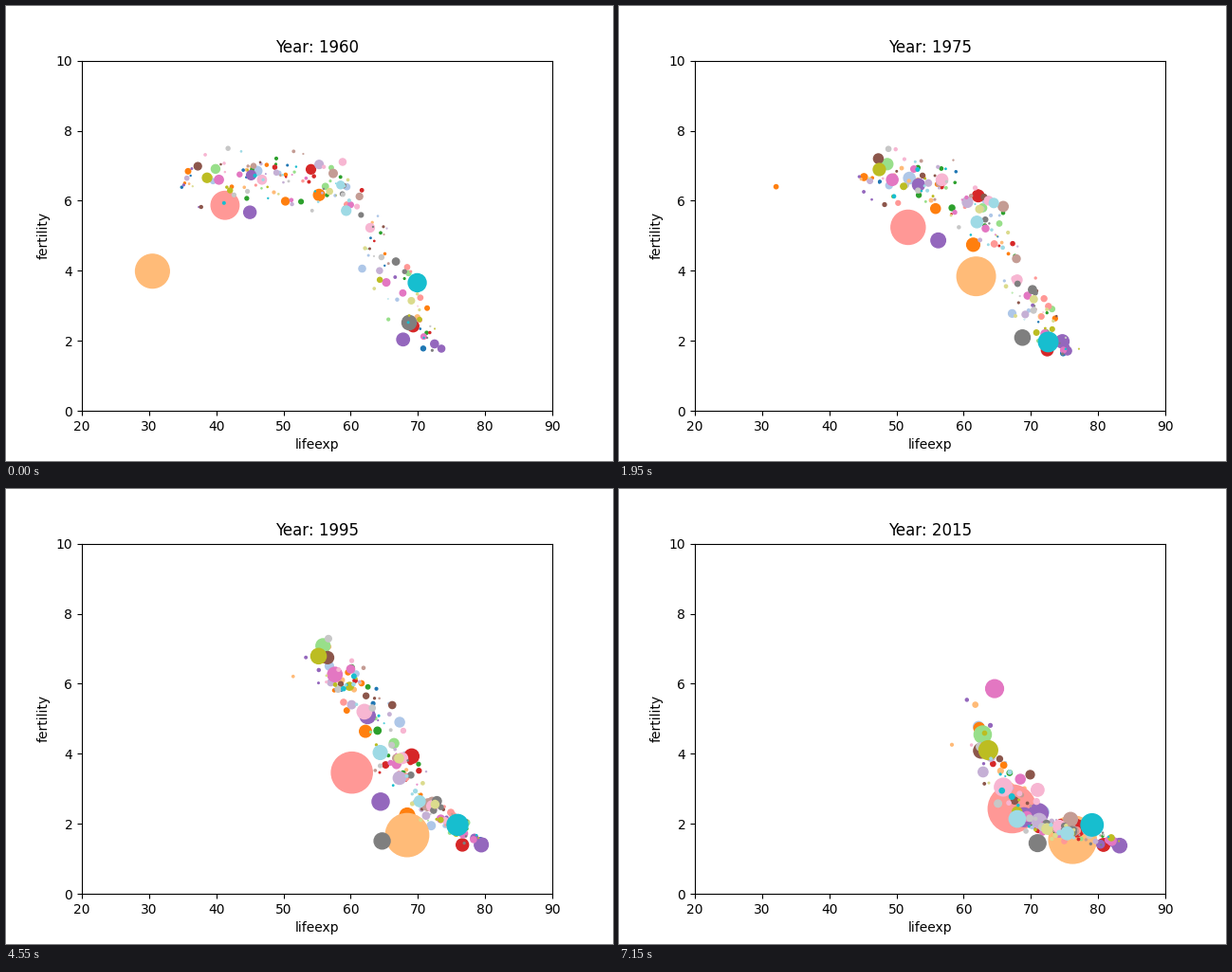
A matplotlib script for the animation above (7.28 s loop, 640x480 px).

```python
import numpy as np
import matplotlib.pyplot as plt
from matplotlib.animation import FuncAnimation

FIRST, COUNT, STEP_MS = 1960, 56, 130
TOTAL, COLOURS = 185, 20

rng = np.random.default_rng(21)
t = np.arange(COUNT)
u = t / (COUNT - 1)
groups = [[] for _ in range(COLOURS)]


def smooth(x):
    x = np.clip(x, 0, 1)
    return x * x * (3 - 2 * x)


def add(colour, pop, life, fert):
    """Store a bubble; its population (millions) grows with its mean fertility."""
    growth = np.clip(0.33 * (fert.mean() - 0.9), 0, 1.4)
    groups[colour].append((life, fert, pop * np.exp(growth * u ** 0.75)))


def add_major(colour, pop, life, power, fert, years, shock=None):
    """Life expectancy eases from start to end, fertility falls between two years."""
    lives = life[0] + (life[1] - life[0]) * u ** power
    if shock:
        year, depth, width = shock
        lives = lives - depth * np.exp(-((t - year) / width) ** 2 / 2)
    fall = smooth((t - years[0]) / (years[1] - years[0]))
    add(colour, pop, lives, fert[0] + (fert[1] - fert[0]) * fall)


def add_minor(colour):
    """Fertility follows life expectancy along a generic falling S-curve."""
    dev = rng.random()
    start = 35 + 38 * dev
    end = min(63 + 17 * dev + rng.normal(0, 3), 83.5)
    wave = np.sin(2 * np.pi * (rng.uniform(0.5, 1.5) * u + rng.random()))
    life = start + (end - start) * u ** 0.75 + 0.7 * wave
    middle = 65.5 + rng.normal(0, 1.8) + 2 * np.sin(np.pi * u) - 3 * u ** 2
    level = 1 + rng.normal(0, 0.06) + 0.03 * np.sin(5 * u + rng.uniform(0, 6))
    fert = level * (1.6 + 5.1 / (1 + np.exp((life - middle) / 3.5)))
    add(colour, np.clip(rng.lognormal(1.0, 1.6), 0.06, 50), life, fert)


# The largest bubble rebounds from a famine, so it has a path of its own.
keys = (0, 2, 5, 9, 20, 29, 35, 55)
add(3, 661,
    np.interp(t, keys, (30.5, 44.5, 54.5, 59.4, 63.9, 66.5, 68.4, 76.2)),
    np.interp(t, keys, (3.99, 5.6, 6.3, 5.67, 2.32, 2.55, 1.68, 1.55)))

add_major(1, 48, (46.1, 70.4), 1.1, (6.85, 2.1), (10, 50))
add_major(2, 72, (55.3, 75.0), 0.9, (6.25, 1.75), (-4, 45))
add_major(2, 5.7, (42.3, 68.0), 0.9, (6.4, 2.65), (25, 52), shock=(17.7, 30, 2.7))
add_major(6, 73, (69.3, 80.8), 1.0, (2.42, 1.4), (4, 22))
add_major(7, 450, (41.3, 67.2), 0.7, (5.87, 2.43), (0, 55))
add_major(8, 88, (45.0, 71.1), 0.65, (5.67, 2.3), (2, 43))
add_major(8, 93, (67.8, 83.2), 0.62, (2.04, 1.38), (10, 38))
add_major(11, 38, (57.4, 75.9), 0.6, (6.78, 2.13), (4, 42))
add_major(12, 45, (40.4, 64.6), 0.75, (6.6, 5.85), (15, 58), shock=(9, 14, 2))
add_major(13, 45, (46.8, 65.9), 0.5, (6.6, 3.05), (20, 55))
add_major(13, 26, (58.8, 71.0), 0.7, (7.2, 2.97), (-5, 52))
add_major(14, 120, (68.7, 71.0), 3, (2.6, 1.45), (-8, 42), shock=(37, 5, 5))
add_major(18, 186, (69.9, 79.1), 0.95, (3.66, 1.97), (0, 14))
add_major(19, 33, (58.5, 75.4), 0.8, (6.45, 1.73), (7, 46))

# Colours run in equal blocks, and later blocks are drawn on top.
sizes = np.bincount(np.arange(TOTAL) * COLOURS // TOTAL)
for colour, size in enumerate(sizes):
    while len(groups[colour]) < size:
        add_minor(colour)

palette = plt.get_cmap("tab20").colors
colours = np.repeat(palette, sizes, axis=0)
life, fert, pop = np.array([b for group in groups for b in group]).transpose(1, 2, 0)

fig, ax = plt.subplots(figsize=(6.4, 4.8), dpi=100)
ax.set(xlim=(20, 90), ylim=(0, 10), xlabel="lifeexp", ylabel="fertility")
bubbles = ax.scatter(life[0], fert[0], s=pop[0], c=colours)
title = ax.set_title(f"Year: {FIRST}")


def draw(i):
    bubbles.set_offsets(np.column_stack((life[i], fert[i])))
    bubbles.set_sizes(pop[i])
    title.set_text(f"Year: {FIRST + i}")
    return bubbles, title


anim = FuncAnimation(fig, draw, frames=COUNT, interval=STEP_MS,
                     repeat=True, repeat_delay=0, blit=False)
plt.show()
```
